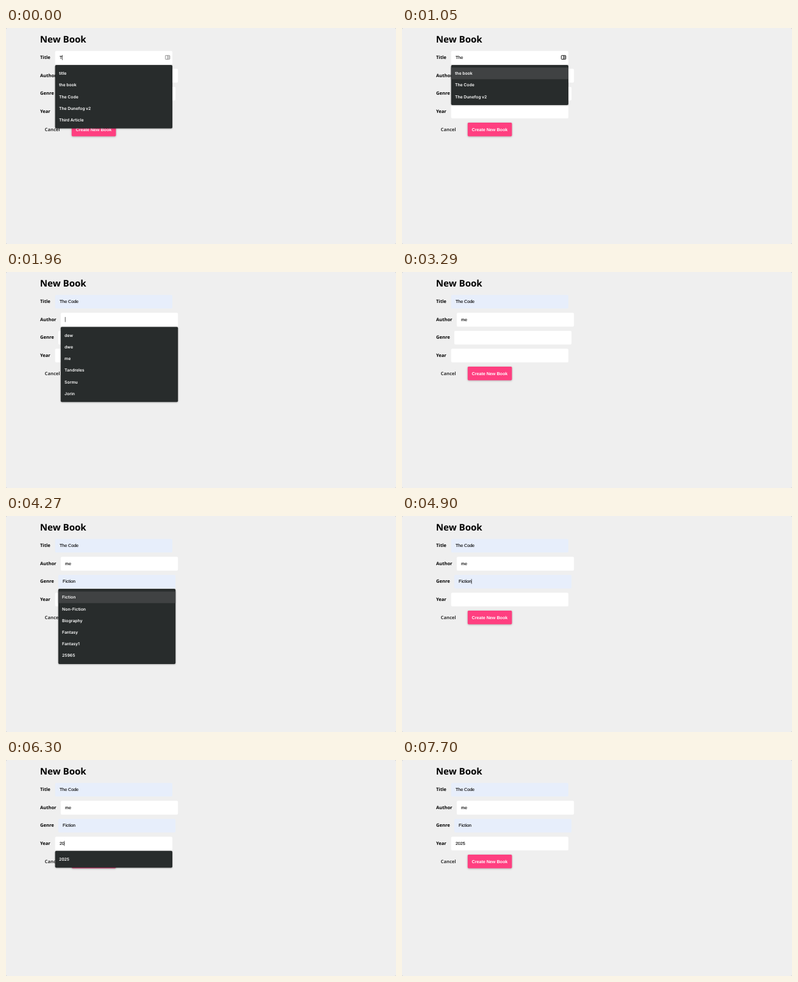
An HTML page for the animation above (8000 ms loop, 640x356 px).

```html
<!DOCTYPE html>
<html lang="en">
<head>
<meta charset="utf-8">
<title>New Book</title>
<style>
  html, body { margin: 0; width: 100%; height: 100%; overflow: hidden; background: #c9c9c9; }
  svg { display: block; width: 100vw; height: 100vh; }
  text { white-space: pre; text-rendering: geometricPrecision; }
  .label { font: 700 7.55px "Open Sans", "Noto Sans", sans-serif; fill: #000; }
  .heading { font-size: 15.1px; }
  .value { font: 7.1px "Liberation Sans", Arial, sans-serif; fill: #000; stroke: #000; stroke-width: .12px; }
  .button { font: 700 7.15px "Liberation Sans", Arial, sans-serif; fill: #fff; }
  .option { font: 600 6.8px Inter, sans-serif; fill: #fff; }
</style>
</head>
<body>
<svg id="stage" viewBox="0 0 640 356">
  <defs>
    <filter id="popupShadow" x="-10%" y="-20%" width="120%" height="150%" color-interpolation-filters="sRGB">
      <feDropShadow dx="0" dy="0.6" stdDeviation="0.8" flood-color="#000" flood-opacity=".32"/>
    </filter>
    <filter id="buttonShadow" x="-10%" y="-30%" width="120%" height="170%" color-interpolation-filters="sRGB">
      <feDropShadow dx="0" dy="0.6" stdDeviation="1.7" flood-color="#000" flood-opacity=".3"/>
    </filter>
  </defs>
  <rect width="640" height="356" rx="2.5" fill="#efefef"/>
  <text class="label heading" x="55.8" y="24.2">New Book</text>
</svg>
<script>
const LOOP = 8000, ROW = 19.2, PITCH = 29.6, WIDTH = 192.4, PAD = 4.3;
const stage = document.getElementById('stage');

function add(parent, tag, attrs, text) {
  const node = document.createElementNS('http://www.w3.org/2000/svg', tag);
  for (const key in attrs) node.setAttribute(key, attrs[key]);
  if (text !== undefined) node.textContent = text;
  parent.append(node);
  return node;
}

function set(node, attrs) {
  for (const key in attrs) node.setAttribute(key, attrs[key]);
}

const fields = [['Title', 80.6], ['Author', 89.8], ['Genre', 85.8], ['Year', 80.6]].map(([name, x], i) => {
  const y = 37.7 + i * PITCH;
  add(stage, 'text', { class: 'label', x: 56, y: y + 13.5 }, name);
  const box = add(stage, 'rect', { x, y, width: WIDTH, height: 22.6, rx: 2 });
  const value = add(stage, 'text', { class: 'value', x: x + 7.3, y: y + 13.4 });
  return { x, y, box, value };
});

add(stage, 'text', { class: 'label', x: 63.6, y: 169.6, style: 'fill:#333' }, 'Cancel');
add(stage, 'rect', { x: 107.8, y: 156, width: 72.6, height: 22.4, rx: 1.6, fill: '#ff3f80', filter: 'url(#buttonShadow)' });
add(stage, 'text', { class: 'button', x: 114.5, y: 169.5 }, 'Create New Book');

const caret = add(stage, 'rect', { width: 0.7, height: 8.2, fill: '#111' });
const icon = add(stage, 'g', { fill: 'none' });
add(icon, 'rect', { x: 261.4, y: 45.3, width: 7.4, height: 6.2, rx: 0.8 });
add(icon, 'path', { d: 'M265 45.3v6.2M266 47.2h2M266 49.5h2' });

const popup = add(stage, 'g', {});
const panel = add(popup, 'rect', { width: WIDTH, rx: 2, fill: '#282c2c', filter: 'url(#popupShadow)' });
const highlight = add(popup, 'rect', { width: WIDTH, height: ROW, fill: '#404243' });
const options = Array.from({ length: 6 }, () => add(popup, 'text', { class: 'option' }));

const titles = ['title', 'the book', 'The Code', 'The Dunefog v2', 'Third Article'];
const authors = ['dew', 'dwe', 'me', 'Tandreles', 'Sormu', 'Jorin'];
const genres = ['Fiction', 'Non-Fiction', 'Biography', 'Fantasy', 'Fantasy1', '25965'];
const years = ['2025', '1997', '1995', '1992', '1001', '23'];
const theTitles = titles.slice(1, 4);

// Each step changes only the named parts; "text" belongs to the focused field.
const steps = [
  [0, { focus: 0, text: 'T', caret: true, list: titles, pick: -1, filled: false, icon: 0.6 }],
  [70, { text: 'Th', list: titles.slice(1), icon: 0.75 }],
  [140, { text: 'The', list: theTitles, icon: 0.9 }],
  [210, { icon: 1 }],
  [700, { caret: false }],
  [1050, { pick: 0 }],
  [1120, { text: 'the book', filled: true }],
  [1260, { text: 'The Code', pick: 1 }],
  [1540, { list: [], pick: -1, caret: true }],
  [1960, { focus: 1, text: '', filled: false, list: authors, icon: 0 }],
  [2450, { caret: false }],
  [2660, { text: 'm', caret: true, list: ['me'] }],
  [2800, { text: 'me', list: [] }],
  [3290, { caret: false }],
  [3710, { focus: 2, text: '', caret: true, list: genres }],
  [4200, { pick: 0, caret: false }],
  [4270, { text: 'Fiction', filled: true }],
  [4480, { list: [], pick: -1, caret: true }],
  [4970, { focus: 3, text: '', filled: false, list: years }],
  [5530, { caret: false }],
  [5950, { text: '2', caret: true, list: ['2025', '23', '22', '21'] }],
  [6300, { text: '20', list: ['2025'] }],
  [6580, { text: '202', list: [] }],
  [6720, { text: '2025' }],
  [7140, { caret: false }]
];

function stateAt(time) {
  const state = { values: ['', '', '', ''], fills: [] };
  for (const [start, change] of steps) {
    if (start > time) break;
    Object.assign(state, change);
    state.values[state.focus] = state.text;
    state.fills[state.focus] = state.filled;
  }
  return state;
}

function drawPopup(field, list, pick) {
  set(popup, { visibility: list.length ? 'visible' : 'hidden' });
  const top = field.y + 23.2;
  set(panel, { x: field.x, y: top, height: list.length * ROW + 2 * PAD });
  set(highlight, { x: field.x, y: top + PAD + Math.max(pick, 0) * ROW, opacity: pick < 0 ? 0 : 1 });
  options.forEach((option, i) => {
    set(option, { x: field.x + 6.3, y: top + PAD + i * ROW + 12 });
    option.textContent = list[i] || '';
  });
}

function draw(time) {
  const state = stateAt(time), active = fields[state.focus];
  fields.forEach((field, i) => {
    field.value.textContent = state.values[i];
    set(field.box, { fill: state.fills[i] ? '#e7eefb' : '#fff' });
  });
  const textWidth = state.text ? active.value.getComputedTextLength() : 0;
  set(caret, { x: active.x + 7 + textWidth, y: active.y + 6.9, opacity: state.caret ? 1 : 0 });
  set(icon, { stroke: '#111', opacity: state.icon, 'stroke-width': 0.5 + state.icon * 0.5 });
  drawPopup(active, state.list, state.pick);
}

const begin = performance.now();
function tick() {
  draw((performance.now() - begin) % LOOP);
  requestAnimationFrame(tick);
}
tick();
</script>
</body>
</html>
```
